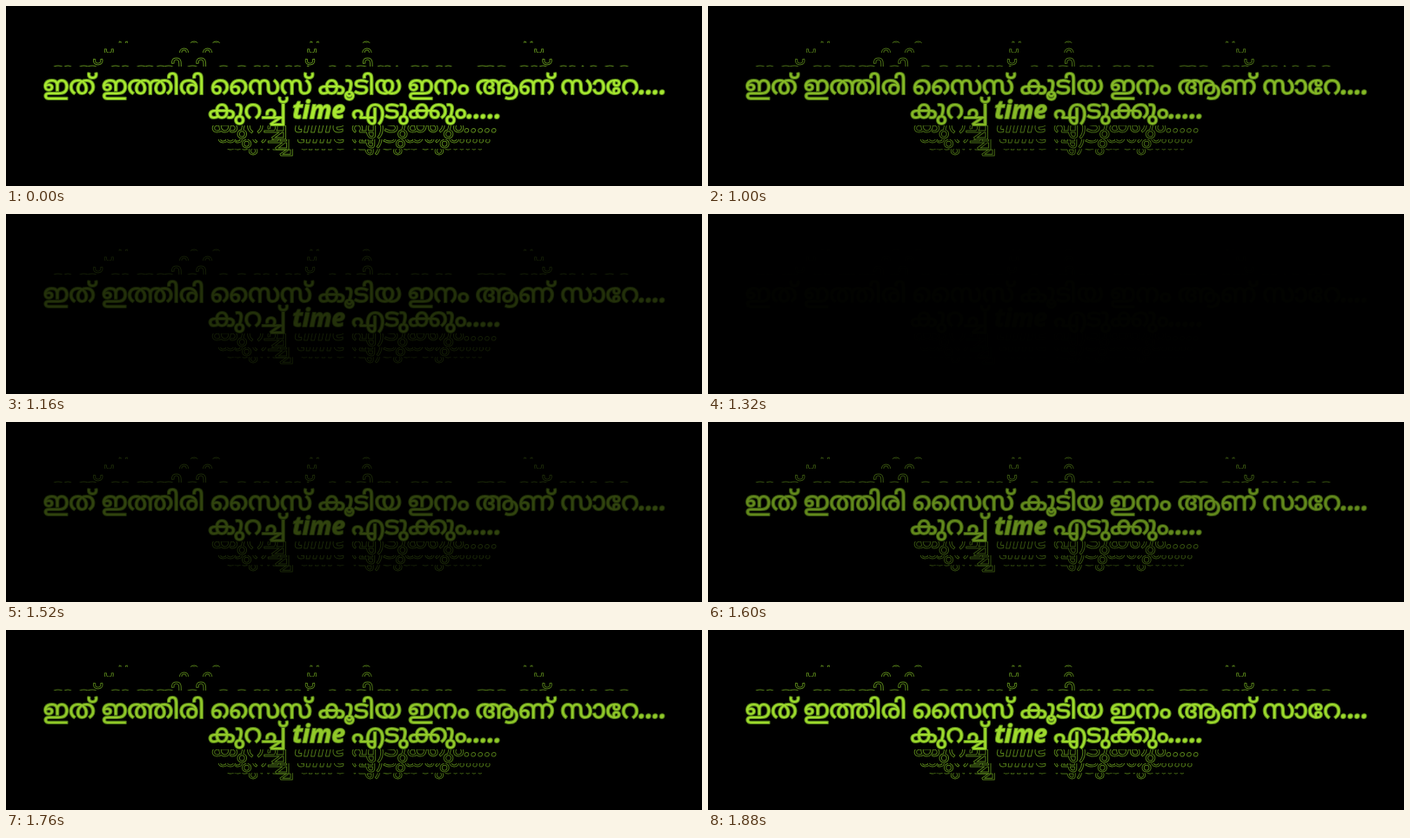
These frames come from a looping animation (800 by 208 pixels, 1960 ms). An HTML page with a canvas:

```html
<!DOCTYPE html>
<html lang="ml">
<meta charset="utf-8">
<style>
html, body { margin: 0; width: 100%; height: 100%; overflow: hidden; background: #000 }
canvas { display: block }
</style>
<canvas id="stage" width="800" height="208"></canvas>
<script>
const canvas = document.getElementById('stage'), g = canvas.getContext('2d');
const malayalam = '30px "Noto Sans Malayalam", "Noto Sans", sans-serif';
const latin = 'italic bold 28px "Open Sans", sans-serif';
const lines = ['ഇത് ഇത്തിരി സൈസ് കൂടിയ ഇനം ആണ് സാറേ....', 'കുറച്ച് time എടുക്കും.....'];
const midX = 401, midY = 104, lineHeight = 28, halfHeight = 32, echoes = 3;

// Centre each line, switching font between scripts.
function drawText(draw) {
  lines.forEach((line, row) => {
    const runs = line.match(/[ .a-z]+|[^ .a-z]+/g).map(text => {
      g.font = /[ .a-z]/.test(text) ? latin : malayalam;
      return { text, font: g.font, width: g.measureText(text).width };
    });
    let x = -runs.reduce((sum, run) => sum + run.width, 0) / 2;
    for (const { text, font, width } of runs) {
      g.font = font;
      draw(text, x, row * lineHeight - 2);
      x += width;
    }
  });
}

const stroke = (...at) => g.strokeText(...at);
const fill = (...at) => g.fillText(...at);

// Half height of the block including its first k echoes
const reach = k => halfHeight + 16 * (1 - .7 ** k) / .3;

function paint() {
  g.lineJoin = 'round';
  // Outlined echoes recede from the text; each layer hides the inside of the one behind it.
  for (let k = echoes; k > 0; k--) {
    const scale = 1 - .0215 * k ** 1.55;
    g.fillStyle = '#000';
    g.fillRect(0, midY - reach(k) - 2, 800, 2 * reach(k) + 4);
    g.strokeStyle = '#5d8a1c';
    g.lineWidth = 1;
    for (const side of [-1, 1]) {
      g.save();
      g.translate(midX, midY + side * (reach(k) - halfHeight * scale));
      g.scale(scale, scale);
      drawText(stroke);
      g.restore();
    }
  }
  g.fillRect(0, midY - halfHeight - 2, 800, 2 * halfHeight + 4);
  g.translate(midX, midY);
  g.strokeStyle = '#5f8f1c';
  g.lineWidth = 2;
  drawText(stroke);
  g.fillStyle = '#a8e830';
  drawText(fill);
}

function opacity(time) {
  const t = Math.floor(time / 40) * 40;
  if (t < 1000) return 1;
  if (t < 1520) return Math.max(.06, 1 - (t - 960) / 360) ** 2 + .01;
  return 1 - .71 * Math.exp((1520 - t) / 145);
}

paint();
const start = performance.now();
function frame() {
  canvas.style.opacity = opacity((performance.now() - start) % 1960);
  requestAnimationFrame(frame);
}
frame();
</script>
</html>
```
